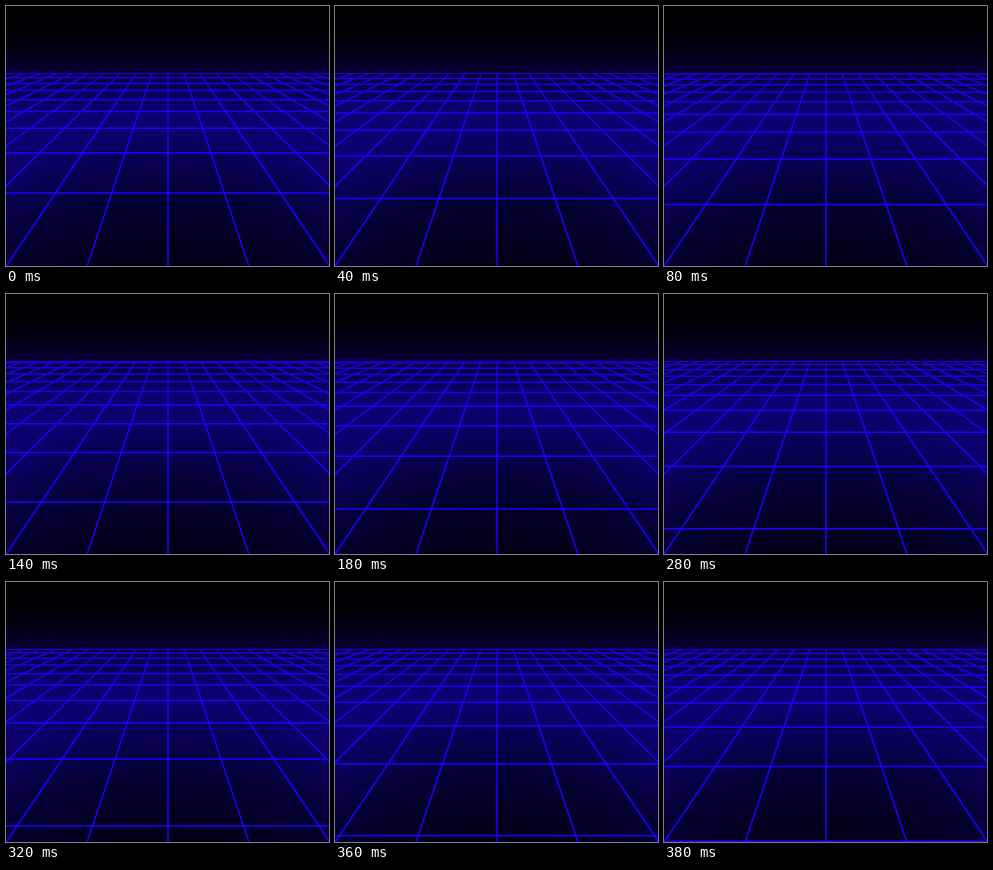
An HTML page with a canvas that plays this animation: 323x260 px, repeating every 400 ms.

```html
<!DOCTYPE html>
<html lang="en">
<head>
<meta charset="utf-8">
<title>Neon grid</title>
<style>
  html, body { margin: 0; width: 100%; height: 100%; overflow: hidden; background: #000; }
  canvas { display: block; }
</style>
</head>
<body>
<canvas id="stage" width="323" height="260"></canvas>
<script>
const ctx = document.getElementById('stage').getContext('2d');
const W = 323, H = 260;
const LOOP = 400, STEP = 20;
const CENTER_X = 162, VANISH_Y = 20, HORIZON_Y = 67.5;
const SLOPE = 0.337;      // column spacing per pixel below the vanishing point
const DEPTH = 526.6;      // row height = VANISH_Y + DEPTH / z
const FAR_Z = 11, START_Z = 3.152;
const GLOW_Y = 460, GLOW_R = 352;

function addStops(gradient, length, stops) {
  for (const [at, color] of stops) gradient.addColorStop(at / length, color);
  return gradient;
}
const vertical = stops => addStops(ctx.createLinearGradient(0, 0, 0, H), H, stops);

const sky = vertical([
  [0, '#000'], [26, '#010006'], [50, '#04001b'], [67, '#080034']
]);
// The floor darkens towards a point below the stage, and again at the horizon.
const floor = addStops(
  ctx.createRadialGradient(CENTER_X, GLOW_Y, 0, CENTER_X, GLOW_Y, GLOW_R), GLOW_R, [
    [200, '#040017'], [235, '#050024'], [273, '#070037'],
    [314, '#0b0058'], [338, '#0e006c'], [352, '#0e0070']
  ]);
const haze = vertical([[68, '#0007'], [88, '#0003'], [106, '#0000']]);
const neon = vertical([[68, '#1a00d0'], [110, '#1c00f4'], [150, '#1c00ff']]);

function line(x1, y1, x2, y2, width) {
  ctx.lineWidth = width;
  ctx.beginPath();
  ctx.moveTo(x1, y1);
  ctx.lineTo(x2, y2);
  ctx.stroke();
}

function fill(style, top) {
  ctx.fillStyle = style;
  ctx.fillRect(0, top, W, H - top);
}

function draw(time) {
  fill(sky, 0);
  fill(floor, 68);
  fill(haze, 68);
  ctx.strokeStyle = neon;

  for (let k = -10; k <= 10; k++) {
    const xAt = y => CENTER_X + k * SLOPE * (y - VANISH_Y);
    line(xAt(HORIZON_Y), HORIZON_Y, xAt(H), H, 1.5);
  }

  line(0, HORIZON_Y, W, HORIZON_Y, 1);
  const phase = Math.floor((time % LOOP) / STEP) * STEP / LOOP;
  for (let z = START_Z - 1 - phase; z < FAR_Z; z++) {
    const y = VANISH_Y + DEPTH / z;
    line(0, y, W, y, 1.5);
  }
}

function tick() {
  draw(performance.now());
  requestAnimationFrame(tick);
}
tick();
</script>
</body>
</html>
```
